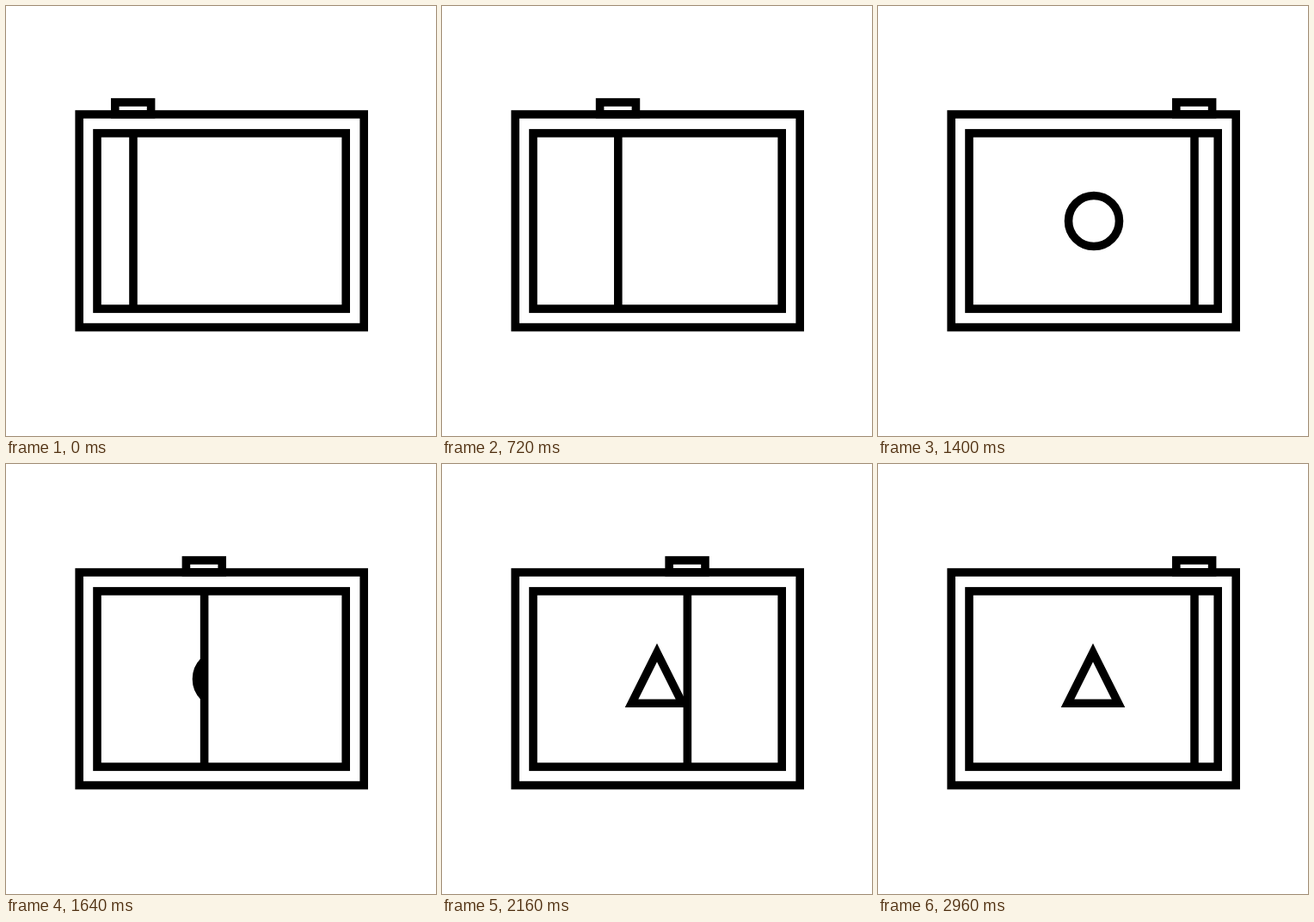
An HTML page for the animation above (4000 ms loop, 500 by 500 pixels).

```html
<!DOCTYPE html>
<html lang="en">
<head>
<meta charset="utf-8">
<title>Drawing board</title>
<style>
html, body { margin: 0; width: 100%; height: 100%; overflow: hidden; background: #fff; }
svg { display: block; width: 100vw; height: 100vh; }
</style>
</head>
<body>
<svg viewBox="0 0 500 500" fill="none" stroke="#000" stroke-width="9.6">
  <clipPath id="clip"><rect id="window" x="0" y="148" height="204"/></clipPath>
  <g clip-path="url(#clip)">
    <rect class="shape" x="221.9" y="220.8" width="59" height="58.4"/>
    <circle class="shape" cx="251" cy="250" r="29.5"/>
    <path class="shape" d="M250 219.3L279.5 278.3H220.5Z"/>
  </g>
  <g id="slider">
    <rect x="126.8" y="112" width="41.8" height="14"/>
    <path d="M148 148V352"/>
  </g>
  <rect x="85.2" y="126" width="331" height="247.6"/>
  <rect x="106" y="147.9" width="289.2" height="204.2"/>
</svg>
<script>
const LOOP = 4000, STEP = 40, REST = 148;
const soft = [0.2, 0.8], settle = [0.28, 0.55];

// start, end, offset from, offset to, easing handles
const moves = [
  [0, 440, 0, 216, soft],
  [480, 880, 216, 0, settle],
  [1000, 1400, 0, 220, soft],
  [1400, 1800, 220, 0, soft],
  [1920, 2320, 0, 220, soft]
];
const pulse = [
  [2680, 2820, 1, 1.2, soft],
  [2820, 2960, 1.2, 1, soft]
];

const shapes = document.querySelectorAll('.shape');
const slider = document.getElementById('slider');
const windowRect = document.getElementById('window');

// cubic-bezier(x1, 0, x2, 1)
function ease(p, [x1, x2]) {
  let lo = 0, hi = 1, u = 0.5;
  for (let i = 0; i < 24; i++) {
    u = (lo + hi) / 2;
    const v = 1 - u;
    if (3 * v * v * u * x1 + 3 * v * u * u * x2 + u ** 3 < p) lo = u;
    else hi = u;
  }
  return u * u * (3 - 2 * u);
}

function valueAt(keys, t) {
  let value = keys[0][2];
  for (const [start, end, from, to, handles] of keys) {
    if (t < start) break;
    value = t >= end ? to : from + (to - from) * ease((t - start) / (end - start), handles);
  }
  return value;
}

function draw(t) {
  const x = valueAt(moves, t), scale = valueAt(pulse, t);
  const current = t < 940 ? 0 : t < 1860 ? 1 : 2;
  slider.setAttribute('transform', `translate(${x})`);
  windowRect.setAttribute('width', REST + x);
  shapes.forEach((shape, i) => shape.setAttribute('visibility', i === current ? 'visible' : 'hidden'));
  shapes[2].setAttribute('transform', `translate(250 246) scale(${scale}) translate(-250 -246)`);
}

const origin = performance.now();
function tick() {
  const t = (performance.now() - origin + 1) % LOOP;
  draw(Math.floor(t / STEP) * STEP);
  requestAnimationFrame(tick);
}
tick();
</script>
</body>
</html>
```
